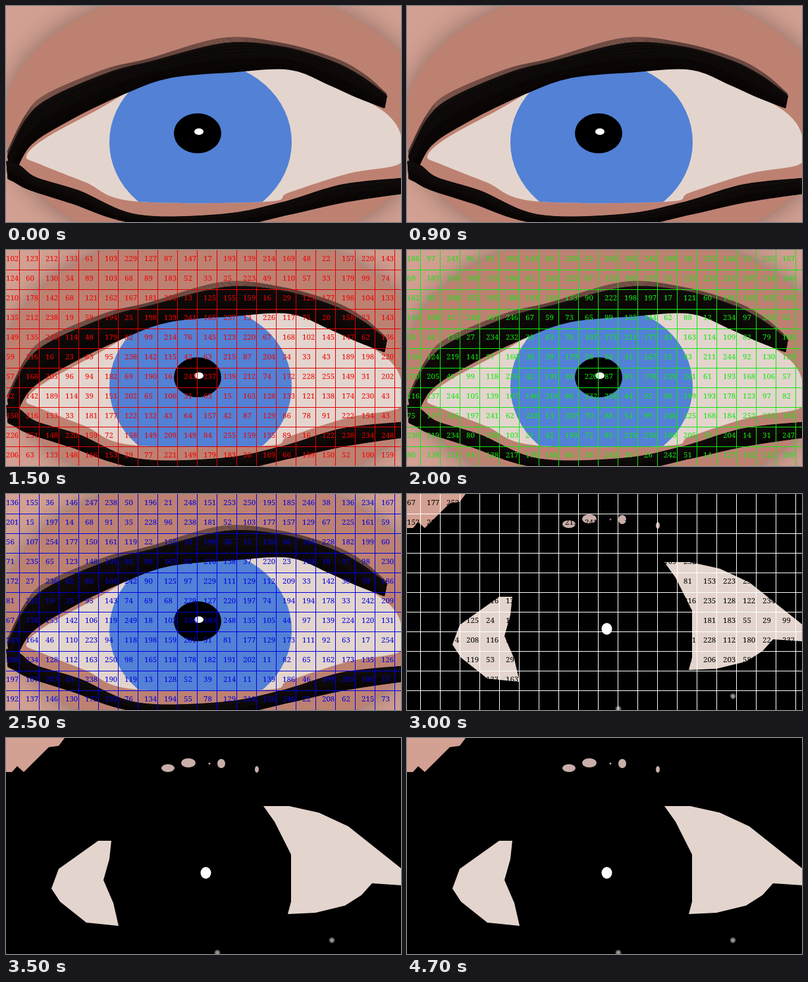
These frames come from a looping animation (600 by 330 pixels, 5.5 s). An HTML page with a canvas:

```html
<!DOCTYPE html>
<html lang="en">
<head>
<meta charset="utf-8">
<title>Eye scan</title>
<style>
  html, body { margin: 0; width: 100%; height: 100%; overflow: hidden; background: #000; }
  canvas { display: block; }
</style>
</head>
<body>
<canvas id="stage" width="600" height="330"></canvas>
<script>
const ctx = document.getElementById('stage').getContext('2d');
const W = 600, H = 330, CELL = 30, LOOP = 5500;
const SCLERA = '#e3d5cd', PALE_SKIN = '#c9aeaa';

const points = text => text.trim().split(/\s+/).map(p => p.split(',').map(Number));
const mix = (a, b, t) => a + (b - a) * t;

function random(seed) {
  return () => (seed = seed * 16807 % 2147483647) / 2147483647;
}

// Smooth path through all points.
function curve(pts, closed) {
  const n = pts.length, path = new Path2D();
  const at = i => closed ? pts[(i + n) % n] : pts[Math.max(0, Math.min(n - 1, i))];
  path.moveTo(...pts[0]);
  for (let i = 0; i < (closed ? n : n - 1); i++) {
    const [a, b, c, d] = [at(i - 1), at(i), at(i + 1), at(i + 2)];
    path.bezierCurveTo(b[0] + (c[0] - a[0]) / 6, b[1] + (c[1] - a[1]) / 6,
                       c[0] - (d[0] - b[0]) / 6, c[1] - (d[1] - b[1]) / 6, ...c);
  }
  return path;
}

function fill(path, color) {
  ctx.fillStyle = color;
  ctx.fill(path);
}

function oval(x, y, rx, ry, color) {
  const path = new Path2D();
  path.ellipse(x, y, rx, ry, 0, 0, Math.PI * 2);
  fill(path, color);
}

function polygon(text, color) {
  const path = new Path2D();
  points(text).forEach(p => path.lineTo(...p));
  fill(path, color);
}

// Bristles spread between two edges; those before `solid` stay translucent.
function brush(outer, inner, solid) {
  const next = random(7);
  const from = points(outer), to = points(inner);
  ctx.lineCap = 'round';
  for (let t = 0; t <= 1; t += 1 / 48) {
    const shade = 4 + Math.floor(next() * 16 * (1 - t));
    ctx.strokeStyle = `rgba(${shade + 5},${shade + 1},${shade},${t < solid ? .5 : 1})`;
    ctx.lineWidth = t < solid ? 1 : 3;
    ctx.stroke(curve(from.map(([x, y], i) => [mix(x, to[i][0], t), mix(y, to[i][1], t)])));
  }
}

const sclera = curve(points(`31,229 60,202 140,158 250,98 360,90 435,96 500,125 560,152
  592,180 603,215 596,242 520,256 430,285 395,299 192,298 120,269 50,241`), true);

function drawEye() {
  ctx.fillStyle = '#d3a193';
  ctx.fillRect(0, 0, W, H);
  ctx.save();
  ctx.shadowColor = 'rgba(110,82,75,.75)';
  ctx.shadowBlur = 40;
  oval(320, 175, 322, 205, '#bd8172');
  ctx.restore();

  fill(sclera, SCLERA);
  ctx.save();
  ctx.clip(sclera);
  oval(295.5, 208, 138.5, 124, '#5281d6');
  ctx.restore();
  oval(291, 194.5, 36, 30.5, '#000');
  oval(293, 192, 7, 5, '#fff');

  brush('2,222 30,166 61,135 150,97 215,81 330,49 420,57 500,80 545,105 578,134',
        '10,264 35,215 92,177 180,134 250,109 345,101 432,97 490,120 530,138 574,155', .16);
  brush('2,238 21,245 45,263 110,283 200,320 330,319 420,301 510,274 602,264',
        '4,264 12,268 35,280 100,301 190,330 330,337 430,318 510,300 602,286', 0);
}

function glow(x, y, r) {
  const g = ctx.createRadialGradient(x, y, 0, x, y, r);
  g.addColorStop(0, '#aaa8a6');
  g.addColorStop(.5, '#777');
  g.addColorStop(1, 'rgba(0,0,0,0)');
  oval(x, y, r, r, g);
}

function drawThreshold() {
  ctx.fillStyle = '#000';
  ctx.fillRect(0, 0, W, H);
  polygon('0,0 89,0 80,12 65,14 27,52 17,43 9,52 0,52', '#d3a193');
  polygon('160,157 140,157 80,200 69,230 82,250 122,282 171,287 163,252 148,217 157,185', SCLERA);
  polygon(`391,104 430,104 475,114 520,135 600,199 600,225 556,222 540,240 515,256 470,267
    428,269 433,250 433,178 408,128`, SCLERA);
  oval(246, 46, 10, 6, PALE_SKIN);
  oval(277, 38, 11, 7, PALE_SKIN);
  oval(309, 39, 1.5, 1.5, PALE_SKIN);
  oval(327, 39, 6, 7, PALE_SKIN);
  oval(381, 48, 3, 5, PALE_SKIN);
  oval(303.5, 206, 8, 9, '#fff');
  glow(495, 309, 6);
  glow(321, 328, 6);
}

function drawGrid(lineColor, textColor, seed) {
  const next = random(seed);
  ctx.fillStyle = textColor;
  ctx.font = '11.5px "Noto Serif", serif';
  for (let y = 0; y < H; y += CELL)
    for (let x = 0; x < W; x += CELL)
      ctx.fillText(10 + Math.floor(next() * 246), x, y + 17);
  ctx.fillStyle = lineColor;
  for (let x = 20; x < W; x += CELL) ctx.fillRect(x, 0, 1, H);
  for (let y = CELL; y < H; y += CELL) ctx.fillRect(0, y, W, 1);
}

const scenes = [
  { start: 0, base: drawEye },
  { start: 1500, base: drawEye, grid: ['#e00000', '#f00000', 48271] },
  { start: 2000, base: drawEye, grid: ['#10e810', '#10e810', 91733] },
  { start: 2500, base: drawEye, grid: ['#0000e0', '#0000e0', 65537] },
  { start: 3000, base: drawThreshold, grid: ['#fff', '#000', 30103] },
  { start: 3500, base: drawThreshold }
];

let shown;
function tick() {
  const time = performance.now() % LOOP;
  const scene = scenes.findLast(s => s.start <= time);
  if (scene !== shown) {
    scene.base();
    if (scene.grid) drawGrid(...scene.grid);
    shown = scene;
  }
  requestAnimationFrame(tick);
}
tick();
</script>
</body>
</html>
```
